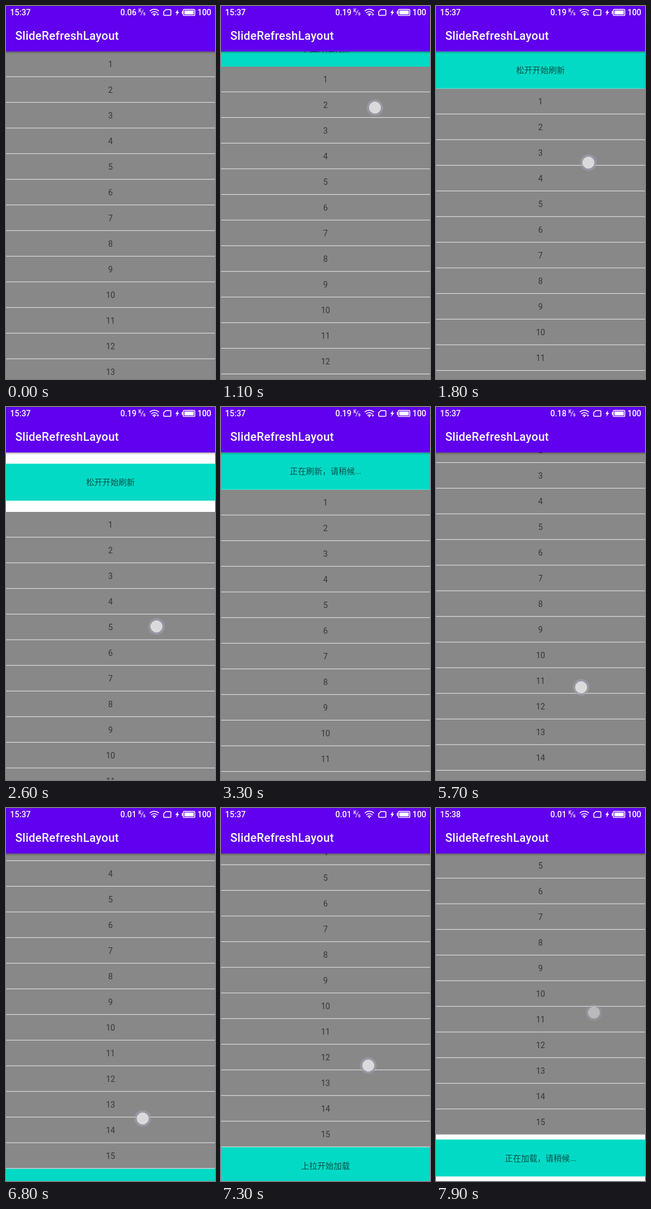
An HTML page for the animation above (8 s loop, 360 by 640 pixels).

```html
<!DOCTYPE html>
<html lang="zh-CN">
<head>
<meta charset="utf-8">
<title>SlideRefreshLayout</title>
<style>
html, body { margin: 0; width: 100%; height: 100%; overflow: hidden; background: #fff; }
svg { display: block; width: 360px; height: 640px; }
text { font: 14px Roboto, "Noto Sans CJK SC", "Noto Sans CJK", sans-serif; }
.mid { text-anchor: middle; fill: #363636; }
.tip { text-anchor: middle; fill: #01504a; }
.bar text { fill: #fff; font-weight: 500; }
.bar .title { font-size: 20px; letter-spacing: .0125em; }
.bar .unit { font-size: 8.5px; }
.line { fill: none; stroke: #fff; stroke-width: 1.6; }
</style>
</head>
<body>
<svg viewBox="0 0 360 640">
  <defs>
    <linearGradient id="shade" x2="0" y2="1">
      <stop offset="0" stop-opacity=".3"/>
      <stop offset="1" stop-opacity="0"/>
    </linearGradient>
    <radialGradient id="glow">
      <stop offset=".6" stop-color="#8c87a0" stop-opacity=".9"/>
      <stop offset=".78" stop-color="#a5a0b4" stop-opacity=".65"/>
      <stop offset=".9" stop-color="#aaa5b9" stop-opacity=".45"/>
      <stop offset="1" stop-color="#aaa5b9" stop-opacity="0"/>
    </radialGradient>
  </defs>
  <rect width="360" height="640" fill="#fff"/>
  <g id="head"><rect width="360" height="63.4" fill="#03dac5"/><text class="tip" x="180" y="37"></text></g>
  <g id="foot"><rect width="360" height="63.4" fill="#03dac5"/><text class="tip" x="180" y="37"></text></g>
  <g id="list"><rect width="360" height="660" fill="#888"/></g>
  <rect y="78" width="360" height="4" fill="url(#shade)"/>
  <g class="bar">
    <rect width="360" height="78" fill="#6000ee"/>
    <text class="title" x="16" y="58">SlideRefreshLayout</text>
    <text id="clock" x="7" y="16"></text>
    <text id="speed" x="197" y="16"></text>
    <text class="unit" x="228" y="11">K</text>
    <path d="M232 16L236.5 6.5" class="line" style="stroke-width:1"/>
    <text class="unit" x="236" y="16">s</text>
    <path class="line" d="M247.5 8.6Q255.5 2.4 263.5 8.6M250 11.8Q255.5 7.2 261 11.8M252.4 14.6Q255.5 12 258.6 14.6"/>
    <circle cx="255.5" cy="16" r="1.3" fill="#fff"/>
    <path id="arrow" d="M259.6 13.6h4l-2 3.2z" fill="#fff"/>
    <path class="line" d="M275.2 6.3H282.8Q284 6.3 284 7.5V14.8Q284 16 282.8 16H272.8Q271.6 16 271.6 14.8V9.8Z"/>
    <path d="M296.4 5.5L291.8 12H294.4L293.2 17L298.2 10H295.6Z" fill="#fff"/>
    <rect class="line" x="305.3" y="5.8" width="20" height="10.6" rx="2" style="stroke-width:1.4"/>
    <rect x="307.2" y="7.7" width="16.2" height="6.8" fill="#fff"/>
    <rect x="302.8" y="8.8" width="2" height="4.6" fill="#fff"/>
    <text x="329.7" y="16">100</text>
  </g>
  <g id="touch">
    <circle r="15" fill="url(#glow)"/>
    <circle r="9.8" fill="#dadada" stroke="#e4e4e4"/>
  </g>
</svg>
<script>
const LOOP = 8000, STEP = 100, FADE = 250, SETTLE = 400;
const TOP = 78, BOTTOM = 640, ROW = 44, ROWS = 15, PANEL = 63.4, OPEN = 64;
const MAX_SCROLL = ROWS * ROW - (BOTTOM - TOP);
const $ = id => document.getElementById(id);

// each gesture is a steady stroke of the finger
const pull = { start: 660, end: 2900, from: [267, 115], to: [258, 417] };
const swipe = { start: 5550, end: 5700, from: [246, 551], to: [250, 481] };
const push = { start: 6540, end: 7800, from: [226, 580], to: [272, 351] };

const part = (t, a, b) => Math.min(1, Math.max(0, (t - a) / (b - a)));
const mix = (a, b, k) => a + (b - a) * k;
const easeOut = k => 1 - (1 - k) ** 2;
const easeInOut = k => (1 - Math.cos(Math.PI * k)) / 2;
const resist = d => 366 * (1 - Math.exp(-d / 800));

function fingerAt(g, t) {
  const k = part(t, g.start, g.end);
  return g.from.map((v, i) => mix(v, g.to[i], k));
}
// gap opened by a drag: resisted while held, then settling to the open height
function gapOf(g, t) {
  const gap = resist(Math.abs(fingerAt(g, t)[1] - g.from[1]));
  return t > g.end ? mix(gap, OPEN, easeOut(part(t, g.end, g.end + SETTLE))) : gap;
}
const headGap = t => gapOf(pull, t) * (1 - easeInOut(part(t, 4860, 5300)));
function footGap(t) {
  const bounce = 21 * Math.sin(Math.PI * part(t, 5760, 6400));
  return bounce + gapOf(push, t);
}
const scrollAt = t => MAX_SCROLL * part(t, swipe.start, 5760);

const move = (el, x, y) => el.setAttribute("transform", `translate(${x} ${y})`);

function add(parent, tag, attrs, label) {
  const el = document.createElementNS("http://www.w3.org/2000/svg", tag);
  for (const key in attrs) el.setAttribute(key, attrs[key]);
  if (label) el.textContent = label;
  parent.append(el);
}
for (let i = 0; i < ROWS; i++) {
  add($("list"), "rect", { y: i * ROW + 42.8, width: 360, height: 1.2, fill: "#d8d8d8" });
  add($("list"), "text", { class: "mid", x: 180, y: i * ROW + 27 }, String(i + 1));
}

function headLabel(t, gap) {
  if (t >= 4000) return "刷新成功";
  if (t >= pull.end) return "正在刷新，请稍候...";
  return gap >= PANEL ? "松开开始刷新" : "下拉开始刷新";
}
function footLabel(t, gap) {
  if (t >= push.end) return "正在加载，请稍候...";
  return gap >= PANEL ? "松开开始加载" : "上拉开始加载";
}
// a panel sticks to the list until fully open, then stays centred in the gap
const inset = gap => Math.max(0, (gap - PANEL) / 2);

function showPanel(el, gap, y, label) {
  el.style.display = gap > 0 ? "" : "none";
  move(el, 0, y);
  el.lastElementChild.textContent = label;
}

function showTouch(t) {
  const g = [pull, swipe, push].find(g => t >= g.start && t < g.end + FADE);
  $("touch").setAttribute("opacity", g ? 1 - part(t, g.end, g.end + FADE) : 0);
  if (g) move($("touch"), ...fingerAt(g, t));
}

function draw(t) {
  const down = Math.round(headGap(t)), up = Math.round(footGap(t));
  move($("list"), 0, TOP + down - Math.round(scrollAt(t)) - up);
  showPanel($("head"), down, TOP + down - PANEL - inset(down), headLabel(t, down));
  showPanel($("foot"), up, BOTTOM - up + inset(up), footLabel(t, up));
  showTouch(t);

  $("speed").textContent = t < 700 ? "0.06" : t < 3700 ? "0.19" : t < 6700 ? "0.18" : "0.01";
  $("clock").textContent = t < 7600 ? "15:37" : "15:38";
  $("arrow").setAttribute("opacity", t < 3700 || (t >= 5300 && t < 6700) ? 1 : 0);
}

let start;
function tick(now) {
  start ??= now;
  draw(Math.floor((now - start) % LOOP / STEP) * STEP);
  requestAnimationFrame(tick);
}
draw(0);
requestAnimationFrame(tick);
</script>
</body>
</html>
```
